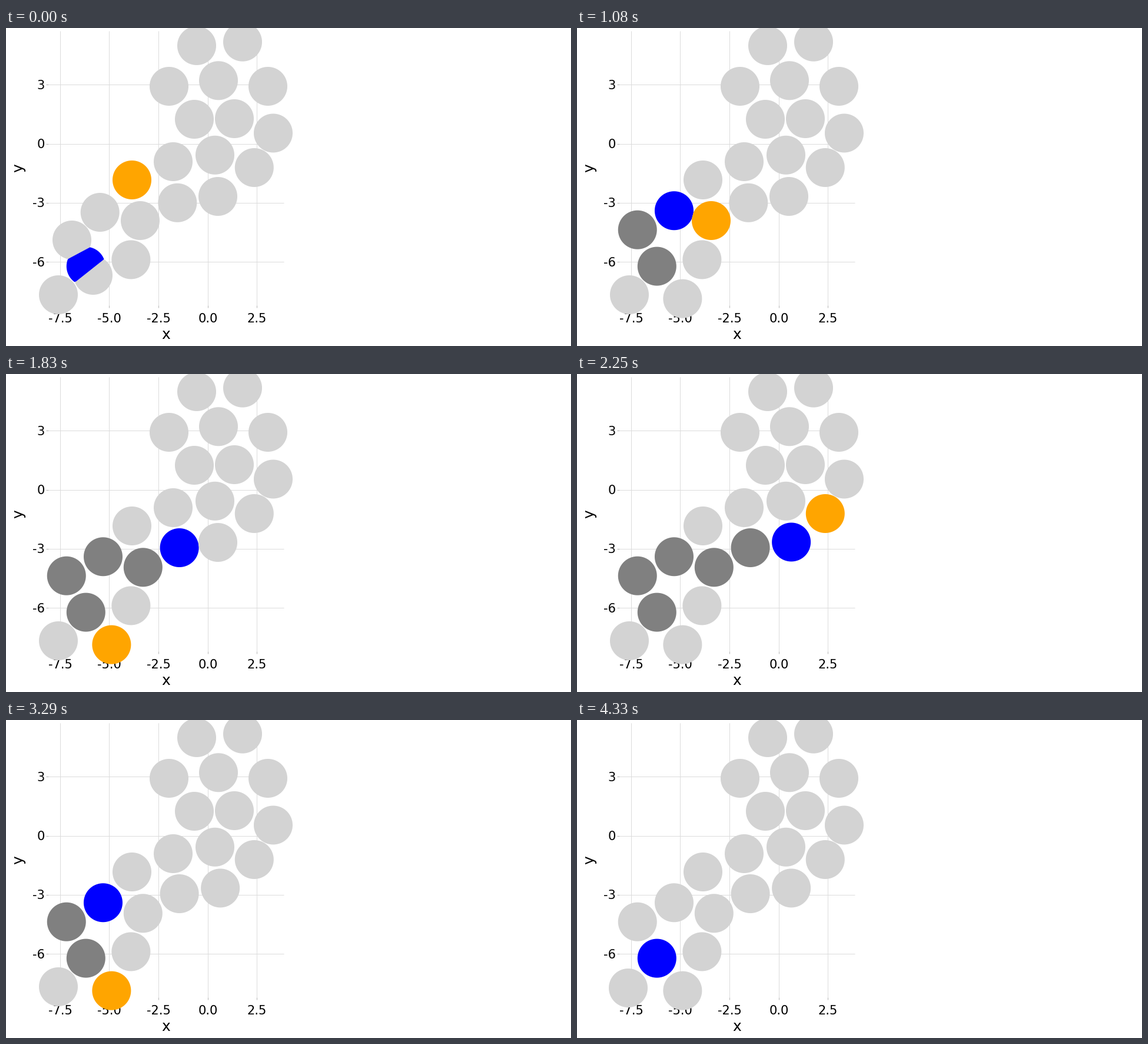
These frames come from a looping animation (960 by 540 pixels, 4370 ms). A matplotlib script:

```python
import matplotlib.pyplot as plt
import numpy as np
from matplotlib.animation import FuncAnimation
from matplotlib.patches import Polygon

W, H, DPI = 960, 540, 100
UNIT = 33.42               # pixels per data unit
ORIGIN = 342.5, 196.6      # pixel position of (0, 0)
RADIUS = 33
TOUCH, GAP = 2.03 * UNIT, 2.1 * UNIT
FRAMES, LOOP_MS = 105, 4370

plt.rcParams["font.family"] = "DejaVu Sans"

DISKS = {
    "A": (112, 360), "B": (159.7, 313), "C": (228, 327), "D": (291.3, 296.8),
    "E": (360, 286), "F": (148, 420), "G": (89, 453), "H": (214, 258),
    "I": (284, 227), "J": (355, 215.8), "K": (421.8, 237), "L": (320, 155),
    "M": (388, 154), "N": (135.8, 404.6), "O": (454, 178.5), "P": (277, 99),
    "Q": (361, 89.3), "R": (445, 99), "S": (324, 30), "T": (402, 23.7),
    "U": (212.4, 393.4),
}

# Neighbours each disk tests, in order
NEAR = {
    "N": "HDUEFCBAIJG", "F": "HDUNABCEG", "A": "HUBDNCFIGEJ",
    "B": "HDNGECLUAFIJ", "C": "DMKGNFLBAUHJIE", "D": "TSROQPKHUABCJMLNFGEI",
    "E": "JDICHOMLKRTSQPBF", "G": "AFUBCHDNI",
}


def simulate(start):
    """Push overlapping disks apart depth first, recording every test."""
    pos = {k: np.array(p, float) for k, p in DISKS.items()}
    states = []

    def record(stack, other=None):
        states.append((dict(pos), stack, other))

    def resolve(stack):
        me = stack[-1]
        for other in NEAR.get(me, ""):
            record(stack, other)
            delta = pos[other] - pos[me]
            dist = np.hypot(*delta)
            if dist < TOUCH and other not in stack:
                pos[other] = pos[me] + delta * GAP / dist
                resolve(stack + other)

    resolve(start)
    while len(states) < FRAMES:
        record(start)
    return states


ANGLES = np.linspace(0, 2 * np.pi, 120, endpoint=False)
RAYS = np.column_stack([np.cos(ANGLES), np.sin(ANGLES)])


def outline(name, pos):
    """Circle cut along the bisector with every overlapping disk."""
    reach = np.full(len(RAYS), float(RADIUS))
    for other, p in pos.items():
        delta = p - pos[name]
        dist = np.hypot(*delta)
        if other != name and dist < 2 * RADIUS:
            facing = np.maximum(RAYS @ delta / dist, 1e-6)
            reach = np.minimum(reach, dist / 2 / facing)
    return pos[name] + RAYS * reach[:, None]


def color(name, stack, other):
    if name == other:
        return "orange"
    if name == stack[-1]:
        return "blue"
    return "gray" if name in stack else "lightgray"


fig = plt.figure(figsize=(W / DPI, H / DPI), dpi=DPI, facecolor="white")
ax = fig.add_axes([0, 0, 1, 1])
ax.set_xlim(0, W)
ax.set_ylim(H, 0)
ax.axis("off")


def line(x, y, shade):
    ax.plot(x, y, color=shade, lw=0.72, solid_capstyle="butt", zorder=1)


def label(x, y, text, px, **kw):
    ax.text(x, y, text, fontsize=px * 72 / DPI, color="black", va="baseline",
            rotation_mode="anchor", zorder=2, **kw)


for v in (-7.5, -5, -2.5, 0, 2.5):
    x = ORIGIN[0] + v * UNIT
    line([x, x], [5, 471], "#dcdcdc")
    line([x, x], [471, 475], "#b4b4b4")
    label(x + 0.5, 500, f"{v:.1f}", 21, ha="center")
for v in (-6, -3, 0, 3):
    y = ORIGIN[1] - v * UNIT
    line([72, 472], [y, y], "#dcdcdc")
    line([68, 72], [y, y], "#b4b4b4")
    label(66, y + 7.6, str(v), 21, ha="right")
label(271.5, 527.5, "x", 25, ha="center")
label(28, 238, "y", 25, ha="center", rotation=90)

STATES = simulate("N")
patches = {k: ax.add_patch(Polygon(RAYS, lw=0, zorder=3)) for k in DISKS}


def update(i):
    pos, stack, other = STATES[i]
    for name, patch in patches.items():
        patch.set_xy(outline(name, pos))
        patch.set_facecolor(color(name, stack, other))
    return list(patches.values())


anim = FuncAnimation(fig, update, frames=FRAMES, interval=LOOP_MS / FRAMES,
                     repeat=True, repeat_delay=0, blit=False)
plt.show()
```
